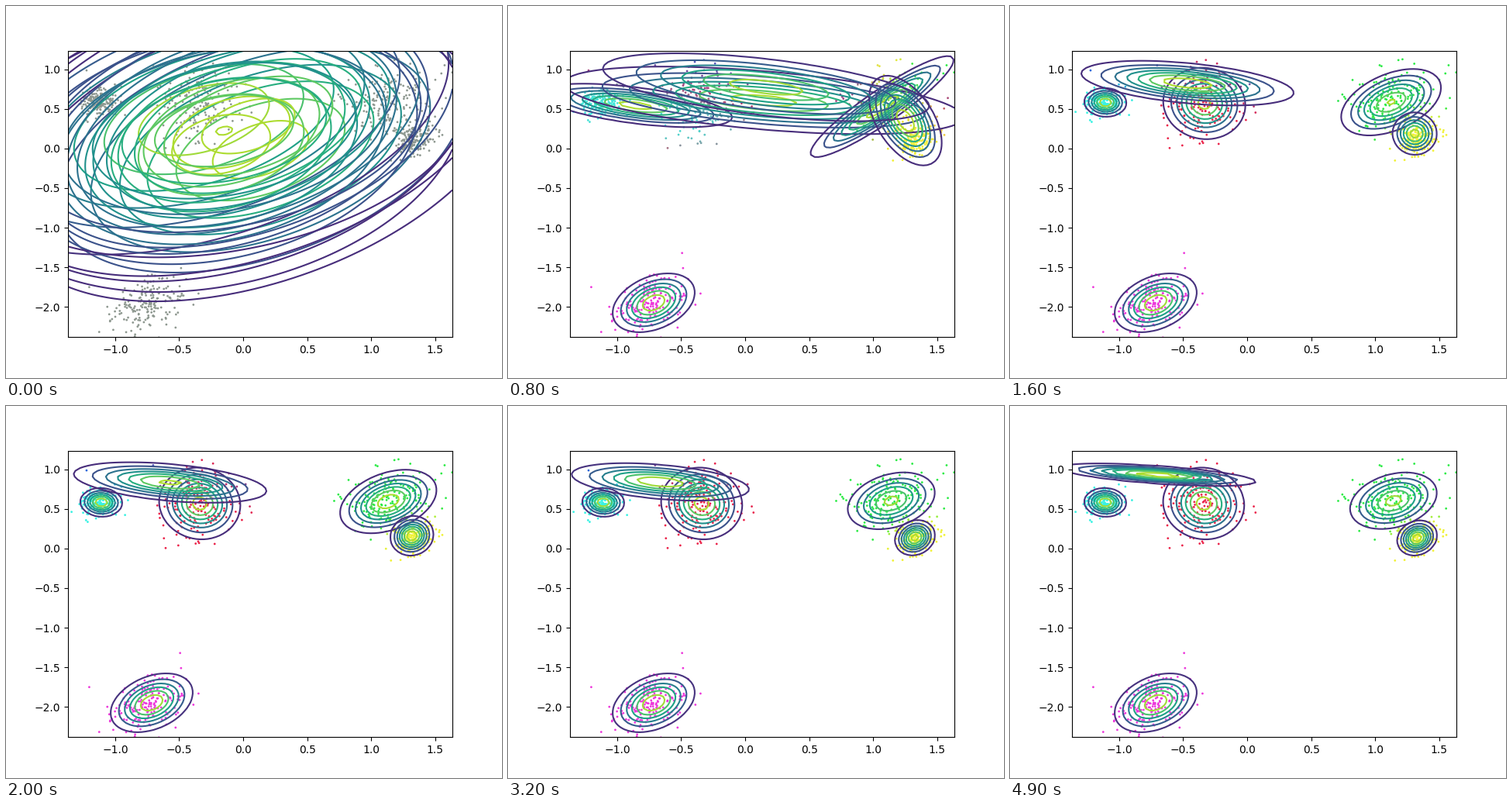
These frames come from a looping animation (640x480 px, 5000 ms). A matplotlib script:

```python
import numpy as np
import matplotlib.pyplot as plt
from matplotlib.animation import FuncAnimation

FRAMES, INTERVAL = 50, 100
XLIM, YLIM = (-1.369, 1.635), (-2.381, 1.2345)
SPREAD_FRAME, DRIFT_FRAME = 8, 32

# Each state: mean x, mean y, std x, std y, correlation.
# A component starts wide, passes its loose state, then decays to its settled one.
SETTLED = np.array([
    (-0.715, -1.948, 0.1630, 0.1885, 0.35),
    (-1.109, 0.582, 0.0823, 0.0912, -0.04),
    (-0.340, 0.568, 0.1575, 0.2255, -0.05),
    (1.143, 0.602, 0.1757, 0.1850, 0.28),
    (1.328, 0.132, 0.0764, 0.1090, 0.15),
    (-0.676, 0.841, 0.3500, 0.1187, -0.40),
])
LOOSE = np.array([
    SETTLED[0],
    (-0.855, 0.543, 0.376, 0.136, -0.55),
    (0.144, 0.607, 0.780, 0.2125, -0.50),
    (1.070, 0.528, 0.276, 0.315, 0.92),
    (1.252, 0.352, 0.139, 0.278, -0.50),
    (0.163, 0.773, 0.656, 0.220, -0.55),
])
FLATTENED = np.array((-0.700, 0.930, 0.380, 0.069, -0.62))
HALF_LIVES = (1, 1, 1.2, 4, 4, 4)
COLORS = np.array([
    (0.93, 0.22, 0.86), (0.22, 0.95, 0.89), (0.92, 0.14, 0.29),
    (0.17, 0.92, 0.27), (0.95, 0.95, 0.22), (0.16, 0.40, 0.85),
])


def make_points(rng, per_cluster=180):
    clusters = []
    for mx, my, sx, sy, rho in SETTLED[:-1]:
        u, v = rng.standard_normal((2, per_cluster))
        v = rho * u + np.sqrt(1 - rho * rho) * v
        clusters.append(np.column_stack([mx + sx * u, my + sy * v]))
    outliers = [(-1.224, 0.985), (1.633, 0.96), (-0.493, -1.32),
                (-1.203, -1.75), (-0.606, 0.005)]
    return np.vstack(clusters + [outliers])


def make_wide(rng):
    """Broad starting Gaussians, close to the spread of all the data."""
    n = len(SETTLED)
    return np.column_stack([
        rng.normal(0, 0.2, (n, 2)), rng.uniform(0.88, 1.0, n),
        rng.uniform(0.78, 1.05, n), rng.uniform(0.25, 0.42, n),
    ])


def blend(a, b, u):
    mixed = a + (b - a) * u
    mixed[2:4] = a[2:4] * (b[2:4] / a[2:4]) ** u
    return mixed


def state(i, frame):
    if frame < SPREAD_FRAME:
        u = frame / SPREAD_FRAME
        return blend(wide[i], LOOSE[i], u * u * (3 - 2 * u))
    u = 1 - 0.5 ** ((frame - SPREAD_FRAME) / HALF_LIVES[i])
    now = blend(LOOSE[i], SETTLED[i], u)
    if i == len(SETTLED) - 1 and frame > DRIFT_FRAME:
        u = (frame - DRIFT_FRAME) / (FRAMES - 1 - DRIFT_FRAME)
        now = blend(now, FLATTENED, u ** 1.7)
    return now


def density(x, y, mx, my, sx, sy, rho):
    u, v = (x - mx) / sx, (y - my) / sy
    q = 1 - rho * rho
    peak = 1 / (2 * np.pi * sx * sy * np.sqrt(q))
    # The floor keeps a contour from forming where exp underflows to zero.
    return peak * np.exp(-(u * u - 2 * rho * u * v + v * v) / (2 * q)) + 1e-100


def point_colors(states, frame):
    weights = np.ones(len(states))
    weights[-1] = np.exp(-frame / 12)
    shares = np.array([w * density(*points.T, *s) for w, s in zip(weights, states)])
    shares **= min(frame / 4, 1)
    shares /= shares.sum(axis=0)
    return np.clip(shares.T @ COLORS, 0, 1)


rng = np.random.default_rng(7)
points, wide = make_points(rng), make_wide(rng)
grid = np.meshgrid(np.linspace(*XLIM, 100), np.linspace(*YLIM, 100))
fig, ax = plt.subplots(figsize=(6.4, 4.8), dpi=100)


def draw(frame):
    ax.clear()
    states = [state(i, frame) for i in range(len(SETTLED))]
    ax.scatter(*points.T, s=4, linewidths=0, c=point_colors(states, frame))
    for s in states:
        ax.contour(*grid, density(*grid, *s))
    ax.set(xlim=XLIM, ylim=YLIM)
    return []


anim = FuncAnimation(fig, draw, frames=FRAMES, init_func=lambda: [],
                     interval=INTERVAL, repeat=True, repeat_delay=0)
plt.show()
```
